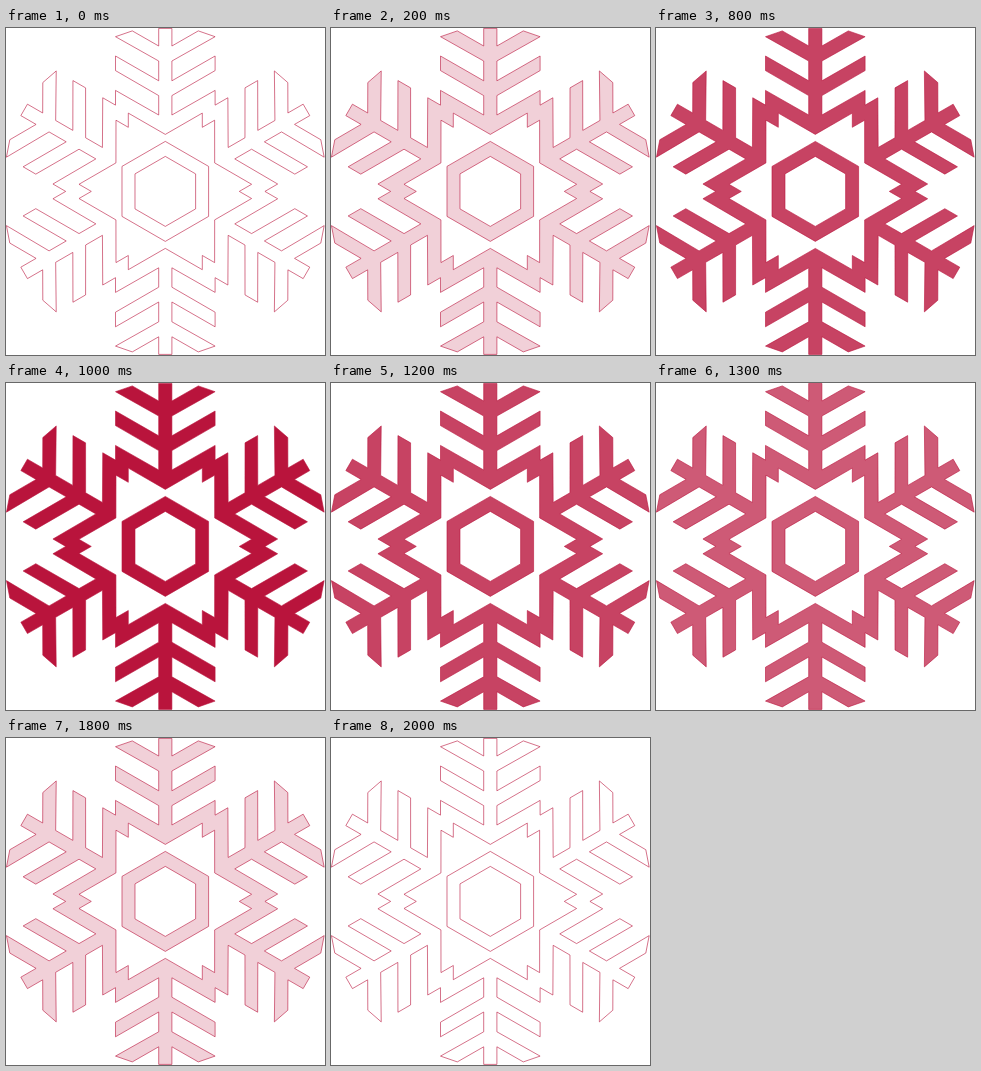
These frames come from a looping animation (319 px wide and 327 px high, 7100 ms). An HTML page with a canvas:

```html
<!DOCTYPE html>
<html lang="en">
<head>
<meta charset="utf-8">
<title>Snowflake</title>
<style>
  html, body { margin: 0; width: 100%; height: 100%; overflow: hidden; background: #fff; }
  canvas { display: block; }
</style>
</head>
<body>
<canvas id="stage" width="319" height="327"></canvas>
<script>
const ctx = document.getElementById('stage').getContext('2d');
const CX = 159.3, CY = 163.4;
const LOOP = 7100, STEP = 100, STEPS = 20;
const COLOR = 'rgb(185,20,60)';

// Half of one arm as [sideways, outward], from tip to the notch between arms.
const STEM = 6.6, TIP = 49.8;
const ARM = [
  [STEM, 163], [STEM, 145.4], [33, 160.5], [TIP, 154.7],
  [STEM, 130.4], [STEM, 110.6], [TIP, 135.4], [TIP, 120.8],
  [STEM, 95.8], [STEM, 76.4], [TIP, 101], [TIP, 86.3]
];
const STAR = [[0, 57], [37, 78.3], [37, 64.1]];

// Mirrors the half arm and repeats it around the centre.
function sixfold(half) {
  const mirrored = half.filter(([s]) => s > 0).reverse().map(([s, r]) => [-s, r]);
  const arm = mirrored.concat(half);
  const points = [];
  for (let i = 0; i < 6; i++) {
    const a = i * Math.PI / 3, sin = Math.sin(a), cos = Math.cos(a);
    for (const [s, r] of arm) {
      points.push([CX + r * sin + s * cos, CY - r * cos + s * sin]);
    }
  }
  return points;
}

const shape = new Path2D();
for (const half of [ARM, STAR, [[0, 50]], [[0, 35]]]) {
  sixfold(half).forEach(([x, y], i) => i ? shape.lineTo(x, y) : shape.moveTo(x, y));
  shape.closePath();
}

function draw(step) {
  ctx.fillStyle = '#fff';
  ctx.fillRect(0, 0, 319, 327);
  ctx.fillStyle = ctx.strokeStyle = COLOR;
  ctx.globalAlpha = 1 - Math.abs(step - STEPS / 2) / (STEPS / 2);
  ctx.fill(shape, 'evenodd');
  ctx.globalAlpha = 1;
  ctx.lineWidth = 0.6;
  ctx.stroke(shape);
}

const start = performance.now();
let shown = -1;

function tick() {
  const t = (performance.now() - start) % LOOP;
  const step = Math.min(STEPS, Math.floor(t / STEP));
  if (step !== shown) draw(shown = step);
  requestAnimationFrame(tick);
}
tick();
</script>
</body>
</html>
```
